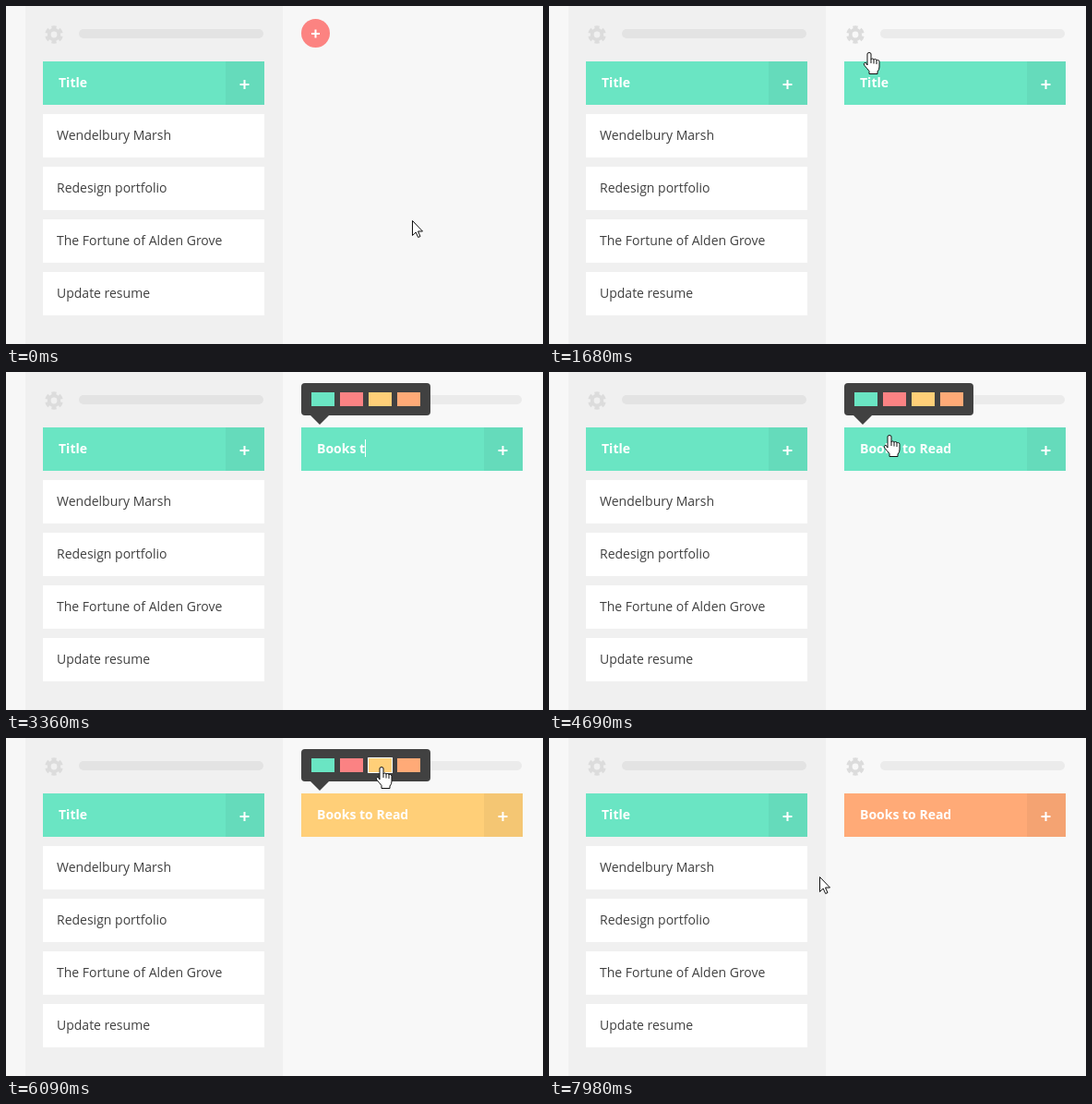
Animation of 582x366 px, one loop 8 s. Source, as an HTML page:

```html
<!DOCTYPE html>
<html lang="en">
<head>
<meta charset="utf-8">
<title>Task grid</title>
<style>
  html, body { margin: 0; width: 100%; height: 100%; overflow: hidden; background: #f7f7f7; }
  svg { display: block; font: 14px "Open Sans", sans-serif; fill: #404040; }
  .title { font-weight: 700; fill: #fff; white-space: pre; }
  .dark { fill: #414141; }
  .plus { stroke: #fff; stroke-width: 2; }
  .gear { fill: none; stroke: #dcdcdc; }
  #cursor path { fill: #fff; stroke: #111; stroke-linejoin: round; }
</style>
</head>
<body>
<svg id="stage" width="582" height="366"></svg>
<script>
const LOOP = 8000, STEP = 70;
const swatches = ['#6ae5c3', '#fb8283', '#ffcf78', '#ffaa77'];
const cards = ['Wendelbury Marsh', 'Redesign portfolio', 'The Fortune of Alden Grove', 'Update resume'];
const typed = 'Books to Read';

const rect = (x, y, w, h, fill, extra = '') =>
  `<rect x="${x}" y="${y}" width="${w}" height="${h}" fill="${fill}" ${extra}/>`;
const plus = (x, y, r) => `<path class="plus" d="M${x - r} ${y}h${2 * r}M${x} ${y - r}v${2 * r}"/>`;

const column = (x, id, panel, bar) => `
  ${rect(x - 19, 0, 279, 366, panel)}
  <g class="gear" transform="translate(${x + 12} 31)">
    <circle r="5.3" stroke-width="3.8"/>
    <circle r="8.2" stroke-width="3.2" pathLength="6" stroke-dasharray=".6 .4" stroke-dashoffset="-.2"/>
  </g>
  ${rect(x + 39, 25, 200, 10, bar, 'rx="5"')}
  ${rect(x, 60, 240, 47, swatches[0], `id="${id}Head"`)}
  ${rect(x + 198, 60, 42, 47, '#000', 'opacity=".045"')}
  ${plus(x + 218.5, 85, 5)}
  <text class="title" id="${id}Title" x="${x + 17}" y="88">Title</text>`;

stage.innerHTML = `
  ${column(40, 'first', '#f0f0f0', '#e3e3e3')}
  ${cards.map((name, i) => rect(40, 117 + 57 * i, 240, 47, '#fff') +
    `<text x="55" y="${145 + 57 * i}">${name}</text>`).join('')}
  <g id="addButton">
    <circle id="disc" cx="335.5" cy="29.5" r="15.5"/>${plus(335.5, 30, 4.5)}
  </g>
  <g id="tooltip">
    <path class="dark" d="M360 28l8-8v16z"/>
    ${rect(367, 11, 87, 34, '#414141', 'rx="5"')}
    <text x="382" y="33" fill="#fff">Add Grid</text>
  </g>
  <g id="second">
    ${column(320, 'second', '#f8f8f8', '#ebebeb')}
    ${rect(0, 73, 1, 19, '#fff', 'id="caret"')}
  </g>
  <g id="popup">
    ${rect(320, 12, 140, 35, '#414141', 'rx="4"')}
    <path class="dark" d="M330 47h20l-10 10z"/>
    ${rect(0, 21, 27, 17, '#fff', 'id="outline"')}
    ${swatches.map((fill, i) => rect(331 + 31 * i, 22, 25, 15, fill)).join('')}
  </g>
  <g id="cursor">
    <path id="arrow" d="M.5 .5V16.5L4.2 13L6.7 18.5L9 17.5L6.5 12H11.5Z"/>
    <path id="hand" d="M-2 14V2Q-2 .5 0 .5T2 2V8Q2 7 3.5 7T5 8.5Q5 7.5 6.5 7.5T8 9Q8 8.5 9.5 8.5T11 10.5V16Q11 19 9 21V23.5H0V20.5Q-2 18-5 14.5Q-6.5 12.5-5 11.5T-2 14M2 8v4M5 8.5v4M8 9v4"/>
  </g>`;

const el = id => document.getElementById(id);
const show = (id, on) => el(id).style.display = on ? '' : 'none';
const between = (t, from, to) => t >= from && t < to;
const clamp = (v, min, max) => Math.min(max, Math.max(min, v));

const home = { x: 440, y: 232 };
const moves = [
  { start: 560, end: 980, x: 337, y: 32 },    // add button
  { start: 1610, end: 1820, x: 368, y: 86 },  // new title
  { start: 4550, end: 4970, x: 372, y: 31 },  // pink
  { start: 5460, end: 5670, x: 407, y: 31 },  // yellow
  { start: 6300, end: 6510, x: 441, y: 31 },  // orange
  { start: 7280, end: 7630, x: 466, y: 137 },
  { start: 7770, end: 7980, x: 293, y: 150 },
];

const cursorAt = t => moves.reduce((pos, move) => {
  const k = clamp((t - move.start) / (move.end - move.start), 0, 1);
  return { x: pos.x + (move.x - pos.x) * k, y: pos.y + (move.y - pos.y) * k };
}, home);

const lettersAt = t => clamp(Math.floor((t - 2660) / 105) + 1, 0, typed.length);
const colorAt = t => clamp(Math.floor((t - 5250) / 805) + 1, 0, 3);

// The caret stays on while typing, then blinks; picking colours restarts the blink
function caretOn(t) {
  if (t >= 5600) return (t - 5600) % 840 < 490;
  return t >= 2100 && Math.max(0, t - 3920) % 980 < 490;
}

function draw(now) {
  const t = Math.floor(now % LOOP / STEP) * STEP;
  const { x, y } = cursorAt(t);
  const added = t >= 1330, popupOpen = between(t, 2100, 7840);
  const title = el('secondTitle');

  show('addButton', !added);
  el('disc').setAttribute('fill', t >= 980 ? '#f07c7d' : '#fc8381');
  show('tooltip', between(t, 1050, 1330));

  show('second', added);
  el('secondHead').setAttribute('fill', swatches[colorAt(t)]);
  title.textContent = typed.slice(0, lettersAt(t)) || 'Title';
  show('caret', caretOn(t));
  if (added) el('caret').setAttribute('x', Math.floor(337 + title.getComputedTextLength()));

  const over = Math.floor((x - 330) / 31);
  show('popup', popupOpen);
  show('outline', between(y, 21, 38) && between(over, 0, swatches.length));
  el('outline').setAttribute('x', 330 + 31 * over);

  const pointing = between(t, 980, 7560), hiddenByTyping = between(t, 2240, 4620);
  show('arrow', !pointing);
  show('hand', pointing && !hiddenByTyping);
  el('cursor').setAttribute('transform', `translate(${Math.round(x)} ${Math.round(y)})`);
}

function tick() {
  draw(performance.now());
  requestAnimationFrame(tick);
}
tick();
</script>
</body>
</html>
```
